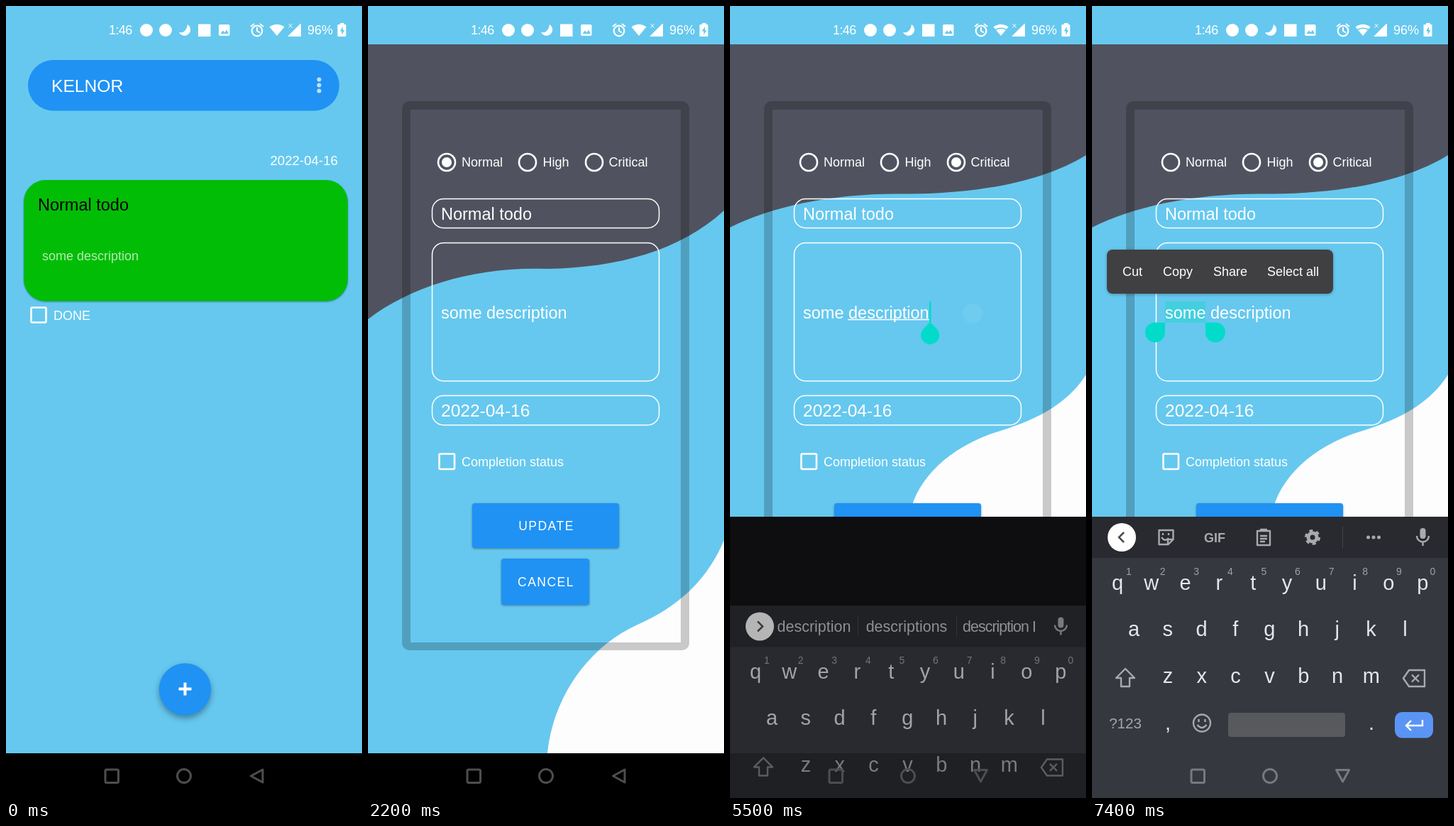
Animation, 502 px wide and 1115 px high, one loop 8000 ms. Source, as an HTML page:

```html
<!DOCTYPE html>
<html lang="en">
<head>
<meta charset="utf-8">
<title>Todo app</title>
<style>
html, body { margin: 0; width: 100%; height: 100%; overflow: hidden; background: #000; }
svg { display: block; width: 100%; height: 100%; }
text { font: 18px "Liberation Sans", Arial, sans-serif; fill: #fff; }
.big { font-size: 23.5px; }
.mid { text-anchor: middle; }
.line { fill: none; stroke: #fff; stroke-width: 1.5; }
.bold { fill: none; stroke: #fff; stroke-width: 2.6; }
.button { fill: #2092f4; filter: drop-shadow(0 1px 1.5px rgba(0,0,0,.4)); }
.caps { font-size: 17.5px; letter-spacing: .085em; text-anchor: middle; }
.word { font-size: 21.5px; fill: #c9cacc; }
.key { font-size: 29px; fill: #e6e6e8; text-anchor: middle; }
.digit { font-size: 14px; fill: #a0a1a6; text-anchor: middle; }
.icon { fill: none; stroke: #a9aaae; stroke-width: 2.4; stroke-linejoin: round; }
.teal { fill: #02dbc9; }
</style>
</head>
<body>
<svg viewBox="0 0 502 1115">
  <g id="home">
    <rect width="502" height="1115" fill="#66c8ef"/>
    <rect x="31" y="76" width="439" height="71.5" rx="35.7" fill="#2092f4"/>
    <text x="64" y="121" style="font-size:24.6px">KELNOR</text>
    <g fill="#c2e0fb"><circle cx="441.500" cy="103.500" r="3"/><circle cx="441.500" cy="111.500" r="3"/><circle cx="441.500" cy="119.500" r="3"/></g>
    <text x="468" y="224" text-anchor="end" style="font-size:18.7px">2022-04-16</text>
    <rect x="25" y="245" width="457" height="170.500" rx="31" fill="#02bd05" style="filter:drop-shadow(0 1px 1px rgba(0,60,90,.5))"/>
    <text class="big" x="45" y="288" style="fill:#000">Normal todo</text>
    <text x="51" y="358" style="fill:#b5ebb5">some description</text>
    <rect class="bold" x="35.500" y="424.500" width="21" height="21" rx="1.500"/>
    <text x="67" y="441.500">DONE</text>
    <circle cx="252.500" cy="962" r="36.700" fill="#2092f4" style="filter:drop-shadow(0 4px 4px rgba(0,0,0,.35))"/>
    <path d="M243.500 961.500h18m-9-9v18" stroke="#fff" stroke-width="4"/>
    <rect y="1052" width="502" height="63"/>
    <rect id="dim" width="502" height="1115" opacity="0"/>
  </g>

  <g id="form">
    <rect width="502" height="1115" fill="#66c8ef"/>
    <g id="backdrop">
      <path d="M0 54H502V288C440 345 350 369 250 370C150 367 60 395 0 441Z" fill="#50535f"/>
      <path d="M253 1052C260 980 305 905 380 871C440 845 480 805 502 752V1052Z" fill="#fdfdfe"/>
    </g>
    <path d="M58 134H443a10 10 0 0 1 10 10V897a10 10 0 0 1-10 10H58a10 10 0 0 1-10-10V144a10 10 0 0 1 10-10ZM60 146V896H441V146Z" fill-rule="evenodd" opacity=".2" style="filter:blur(.7px)"/>
    <circle id="ripple" cx="319" cy="220" fill="#fff"/>
    <g id="radios"></g>
    <rect class="line" x="90.500" y="271.500" width="320" height="41" rx="16"/>
    <rect class="line" x="90.500" y="333.500" width="320" height="194.500" rx="16"/>
    <rect class="line" x="90.500" y="548.500" width="320" height="41.500" rx="16"/>
    <text class="big" x="103" y="301">Normal todo</text>
    <rect id="highlight" x="103" y="416" width="57" height="29.500" fill="#43cfdf"/>
    <text class="big" x="103" y="439.500">some description</text>
    <path id="underline" d="M166 441.500H281" stroke="#fff" stroke-width="1.300"/>
    <text x="103" y="578" style="font-size:24.5px">2022-04-16</text>
    <rect class="bold" x="100.500" y="630.500" width="21.500" height="21.500" rx="1.500"/>
    <text x="132" y="648">Completion status</text>
    <rect class="button" x="147" y="700" width="207" height="63" rx="4"/>
    <rect class="button" x="188" y="778" width="124" height="65" rx="4"/>
    <text class="caps" x="251.500" y="738">UPDATE</text>
    <text class="caps" x="251" y="817">CANCEL</text>
    <rect y="1052" width="502" height="63"/>
    <rect id="cursor" class="teal" x="281" y="416" width="2.500" height="30"/>
    <path id="drop" class="teal" d="M0 0h14a14 14 0 1 1-14 14z" transform="translate(282.200 445) rotate(45) scale(.93)"/>
    <g id="handles" class="teal">
      <path d="M0 0h14a14 14 0 1 1-14 14z" transform="translate(160 445.500)"/>
      <path d="M0 0h14a14 14 0 1 1-14 14z" transform="translate(103 445.500) scale(-1 1)"/>
    </g>
    <g id="toolbar">
      <rect x="21" y="343" width="319" height="62" rx="8" fill="#404043" style="filter:drop-shadow(0 1px 2px rgba(0,0,0,.3))"/>
      <text x="43" y="380">Cut</text><text x="100" y="380">Copy</text>
      <text x="171" y="380">Share</text><text x="247" y="380">Select all</text>
    </g>
  </g>

  <g id="panel">
    <rect y="719" width="502" height="396" fill="#0e0d0f"/>
    <g id="keyboard">
      <rect y="719" width="502" height="396" fill="#36383f"/>
      <rect y="719" width="502" height="58" fill="#282a2f"/>
      <circle cx="42" cy="748" r="20" fill="#fff"/>
      <path id="chevron" d="M39 741l7 7-7 7" fill="none" stroke="#4a4b50" stroke-width="2.500"/>
      <g id="words">
        <text class="word mid" x="118.500" y="755.500">description</text>
        <text class="word mid" x="249" y="755.500">descriptions</text>
        <text class="word" x="328" y="755.500" letter-spacing="-1">description I</text>
        <path d="M180.500 733v30M319.500 733v30" stroke="#414348"/>
      </g>
      <g id="tools">
        <path class="icon" d="M94.500 738h20v13l-7 7h-13zM114 751h-7v7M98 748q5 7 10 1M100 742v3M108 742v3"/>
        <text class="mid" x="173" y="754.500" style="font-weight:bold;fill:#a9aaae">GIF</text>
        <path class="icon" d="M233 739h18v20h-18zM238 739v-2h8v2M237 746h10M237 750h10M237 754h7"/>
        <circle class="icon" cx="311" cy="748" r="6" style="stroke-width:5"/>
        <circle class="icon" cx="311" cy="748" r="9.500" stroke-dasharray="5 4.950" style="stroke-width:3"/>
        <path d="M353.500 733v30" stroke="#414348"/>
        <g fill="#a9aaae"><circle cx="389.500" cy="748" r="2.500"/><circle cx="397" cy="748" r="2.500"/><circle cx="404.500" cy="748" r="2.500"/></g>
      </g>
      <rect x="462.500" y="735" width="8" height="15" rx="4" fill="#a9aaae"/>
      <path class="icon" d="M458 746a8.500 8.500 0 0 0 17 0M466.500 755v5"/>
      <g id="keys"></g>
      <path class="icon" d="M47 933l13 13h-7v12h-12v-12h-7z"/>
      <path class="icon" d="M447 935h22v23h-22l-8-11.500zM451 941.500l10 10m0-10l-10 10"/>
      <text class="mid" x="47" y="1017" style="font-size:20.5px;fill:#a5a6ab">?123</text>
      <circle class="icon" cx="155" cy="1009.500" r="12"/>
      <path class="icon" d="M148.500 1012q6.500 8 13 0M150.500 1004v4M159.500 1004v4"/>
      <rect x="192" y="995" width="165" height="34" rx="4" fill="#57595d"/>
      <rect x="427" y="994" width="54" height="36.500" rx="10" fill="#5a95f5"/>
      <path d="M466 1005v8h-23m7-7l-7 7 7 7" fill="none" stroke="#fff" stroke-width="2.400"/>
    </g>
    <rect id="navShade" y="1052" width="502" height="63"/>
  </g>

  <g id="nav" fill="none" stroke-width="3" stroke-linejoin="round">
    <rect x="140" y="1075" width="18.500" height="18.500" rx="2"/>
    <circle cx="251" cy="1084" r="9.500"/>
    <path id="back" d="M362 1075v18l-16.500-9z"/>
  </g>

  <g id="status" fill="#fff">
    <text x="145" y="40" letter-spacing="-.6">1:46</text>
    <circle cx="198" cy="34" r="9"/>
    <circle cx="225" cy="34" r="9"/>
    <path d="M256 26a8.500 8.500 0 1 1-12 11q10 2 12-11z"/>
    <rect x="271" y="25.500" width="17.500" height="17.500"/>
    <rect x="300" y="26" width="15.500" height="16" rx="2"/>
    <path d="M302.500 39l3.500-4.500 2.500 3 2.500-4 3 5.500z" fill="#66c8ef"/>
    <path d="M345 29l5-4M363 29l-5-4M354 30v5l4 2.500" fill="none" stroke="#fff" stroke-width="2"/>
    <circle cx="354" cy="35" r="7.300" fill="none" stroke="#fff" stroke-width="2.200"/>
    <path d="M382 42L371.500 29.500Q382 22 392.500 29.500Z"/>
    <path id="wifiGap" d="M374 33.500Q382 29 390 33.500" fill="none" stroke="#66c8ef" stroke-width="1.500"/>
    <path d="M415.500 25v17.500h-17.500zM398.500 25l5 5.500m0-5.500l-5 5.500" stroke="#fff" stroke-width="1"/>
    <text x="425" y="40">96%</text>
    <path d="M471.500 26.500v-2h5v2h2.500v16h-11v-16z" stroke="#fff" stroke-linejoin="round"/>
    <path d="M475 29l-4 6.500h2.500v5l4-6.500h-2.500z" fill="#66c8ef"/>
  </g>
  <circle id="touch" r="14" fill="#fff"/>
</svg>
<script>
const LOOP = 8000, OPEN = 1685, KEYBOARD = 5440, SELECT = 7000;
const $ = id => document.getElementById(id);
const ramp = (t, from, to) => Math.min(1, Math.max(0, (t - from) / (to - from)));
const within = (t, from, to) => t >= from && t < to;
const show = (id, on) => { $(id).style.display = on ? '' : 'none'; };
const set = (id, name, value) => $(id).setAttribute(name, value);
const zoom = s => `translate(251 557.5) scale(${s}) translate(-251 -557.5)`;

// down, up, x, y
const touches = [
  [1400, 1560, 250, 335],
  [3300, 3420, 321, 222],
  [5300, 5420, 342, 433],
  [6500, 7050, 133, 433]
];

$('radios').innerHTML = [[111, 'Normal', 132], [225, 'High', 246.5], [319, 'Critical', 339.5]]
  .map(([cx, label, x]) => `<circle class="bold" cx="${cx}" cy="220" r="12"/>
    <circle id="dot${label}" cx="${cx}" cy="220" r="0" fill="#fff"/>
    <text x="${x}" y="226">${label}</text>`).join('');

const keyRow = (letters, x, y) => [...letters]
  .map((c, i) => `<text class="key" x="${x + 47.8 * i}" y="${y}">${c}</text>`).join('');
$('keys').innerHTML = keyRow('qwertyuiop', 36, 822) + keyRow('asdfghjkl', 59, 887) +
  keyRow('zxcvbnm', 107, 953) + keyRow(',', 107, 1019) + keyRow('.', 394, 1019) +
  [...'1234567890'].map((c, i) => `<text class="digit" x="${52 + 47.6 * i}" y="801">${c}</text>`).join('');

// Two joined Bezier pieces: a quick start and a very long settling
function settle(x) {
  const [a, b, c, d] = x < 1 / 6
    ? [[0, 0], [.05, 0], [.1333, .06], [1 / 6, .4]]
    : [[1 / 6, .4], [.2083, .82], [.25, 1], [1, 1]];
  const at = (s, k) => a[k] * (1 - s) ** 3 + 3 * b[k] * s * (1 - s) ** 2 +
    3 * c[k] * s * s * (1 - s) + d[k] * s ** 3;
  let low = 0, high = 1;
  for (let i = 0; i < 24; i++) {
    const half = (low + high) / 2;
    if (at(half, 0) < x) low = half; else high = half;
  }
  return at(low, 1);
}

function render(t) {
  const opening = settle(ramp(t, OPEN, OPEN + 400));
  set('home', 'transform', zoom(1 + .05 * opening));
  set('dim', 'opacity', .1 * opening);
  show('form', t >= OPEN);
  set('form', 'transform', zoom(.85 + .15 * opening));
  set('form', 'opacity', ramp(t, OPEN + 30, OPEN + 113));

  set('dotNormal', 'r', 7 * (1 - ramp(t, 3400, 3550)));
  set('dotCritical', 'r', 7 * ramp(t, 3450, 3600));
  set('ripple', 'r', 12 + 16 * ramp(t, 3320, 3550));
  set('ripple', 'opacity', .18 * ramp(t, 3300, 3380) * (1 - ramp(t, 3550, 3950)));

  const typing = t >= KEYBOARD, selected = t >= SELECT;
  const squash = typing ? 665 / 998 : 1;
  set('backdrop', 'transform', `translate(0 ${54 * (1 - squash)}) scale(1 ${squash})`);
  show('panel', typing);
  const rise = ramp(t, KEYBOARD, KEYBOARD + 260);
  set('keyboard', 'transform', `translate(0 ${212 * (1 - rise) ** 2})`);
  set('keyboard', 'opacity', Math.min(1, rise * 3));
  set('navShade', 'opacity', .32 * (1 - rise));
  set('nav', 'stroke', typing && rise > .5 ? '#77797d' : '#4e4e50');
  set('back', 'transform', typing ? 'rotate(-90 353.5 1084)' : '');

  show('cursor', within(t, KEYBOARD, 6000) || within(t, 6500, SELECT));
  show('drop', typing && !selected);
  show('underline', typing && !selected);
  show('highlight', selected);
  show('handles', selected);
  const tools = t >= SELECT + 100;
  show('words', !tools);
  show('tools', tools);
  set('chevron', 'd', tools ? 'M45 741l-7 7 7 7' : 'M39 741l7 7-7 7');
  set('toolbar', 'opacity', ramp(t, 7150, 7380));
  show('wifiGap', within(t, 3300, 6000) || t >= 7400);

  const touch = touches.find(([down, up]) => within(t, down, up + 100));
  show('touch', touch);
  if (touch) {
    const [, up, x, y] = touch;
    set('touch', 'cx', x);
    set('touch', 'cy', y);
    set('touch', 'opacity', .3 * (1 - ramp(t, up, up + 100)));
  }
}

let start;
function tick(now) {
  start ??= now;
  render((now - start) % LOOP);
  requestAnimationFrame(tick);
}
render(0);
requestAnimationFrame(tick);
</script>
</body>
</html>
```
